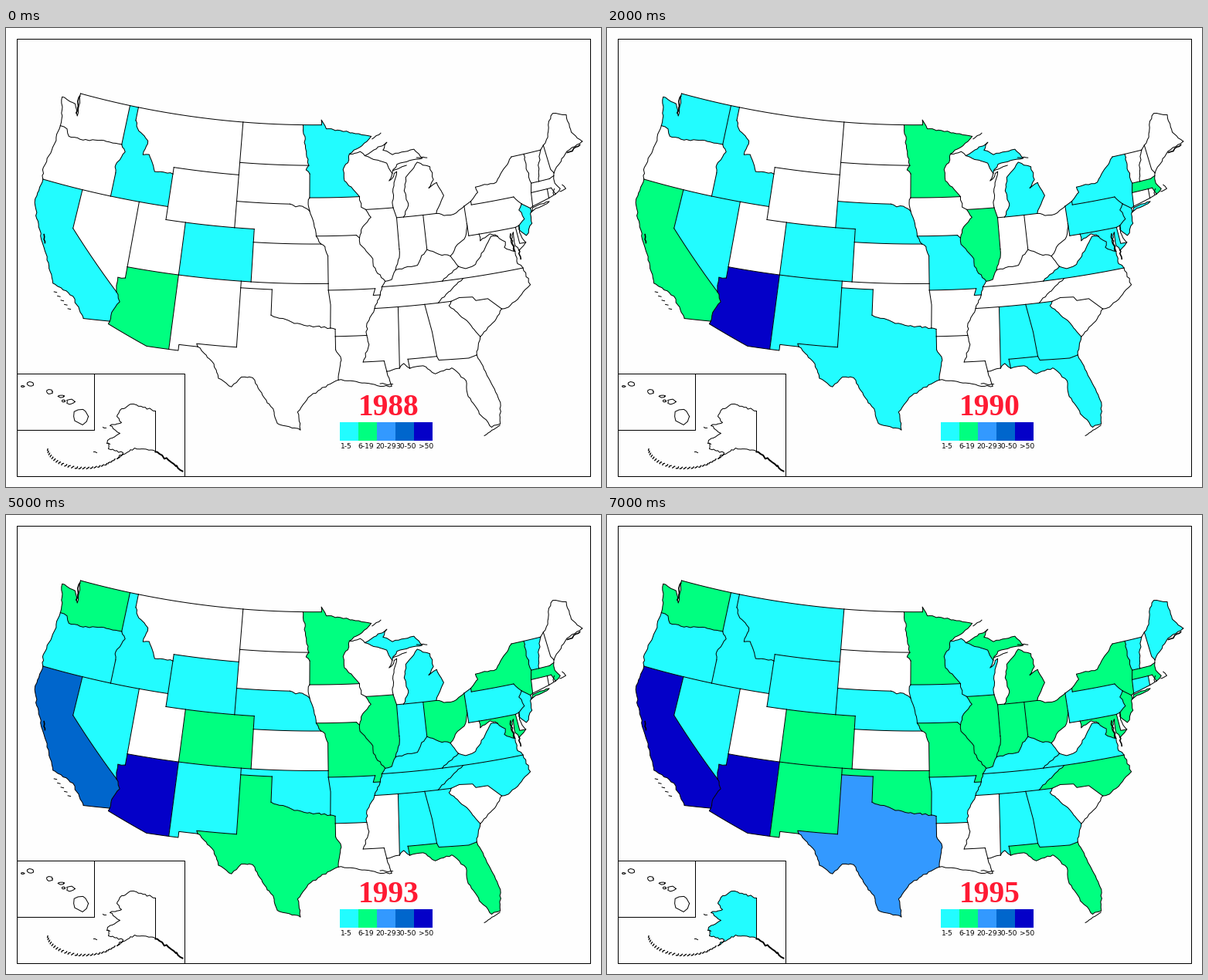
Recreate the animation shown at these times as a matplotlib script. Size 770 by 595 pixels, loop 8000 ms.

```python
import math
import random

import matplotlib.pyplot as plt
from matplotlib.animation import FuncAnimation
from matplotlib.patches import Polygon, Rectangle

W, H, DPI = 770, 595, 100
PX = 72 / DPI
rng = random.Random(5)
COLORS = ["white", "#22fcff", "#00ff80", "#3399ff", "#0066cc", "#0400c8"]
LABELS = ["1-5", "6-19", "20-29", "30-50", ">50"]

fig = plt.figure(figsize=(W / DPI, H / DPI), dpi=DPI, facecolor="#fefefe")
ax = fig.add_axes([0, 0, 1, 1])
ax.set_xlim(-0.5, W - 0.5)
ax.set_ylim(H - 0.5, -0.5)
ax.axis("off")

borders = []


def project(west, north):
    """Conic projection centred on 96 degrees west."""
    angle = (96 - west) * 0.01
    radius = 1346 + 17.15 * (37 - north)
    return 398 + radius * math.sin(angle), radius * math.cos(angle) - 1015


def pairs(values):
    return list(zip(values[::2], values[1::2]))


def subdivide(pts, step, shake=0):
    """Break a polyline into short pieces and shake the inner points."""
    out = [pts[0]]
    for (x0, y0), (x1, y1) in zip(pts, pts[1:]):
        n = max(1, round(math.hypot(x1 - x0, y1 - y0) / step))
        for i in range(1, n):
            t = i / n
            out.append((x0 + (x1 - x0) * t + rng.uniform(-shake, shake),
                        y0 + (y1 - y0) * t + rng.uniform(-shake, shake)))
        out.append((x1, y1))
    return out


def stroke(pts, width=1):
    xs, ys = zip(*pts)
    ax.plot(xs, ys, color="black", lw=width * PX, snap=False, zorder=3)


def border(states, pts):
    borders.append((states.split(), pts))
    stroke(pts)


def line(states, *degrees):
    border(states, [project(*p) for p in subdivide(pairs(degrees), 1)])


def river(states, *degrees):
    border(states, subdivide([project(*p) for p in pairs(degrees)], 4, 1))


def parallel(north, west, *steps):
    """Run east along a latitude: the states that meet, then where they stop."""
    for states, stop in pairs(steps):
        line(states, west, north, stop, north)
        west = stop


def meridian(west, north, *steps):
    """Run south along a longitude in the same way."""
    for states, stop in pairs(steps):
        line(states, west, north, west, stop)
        north = stop


def blot(*degrees, width=1.6, shake=1.5):
    """Dark tangle of small islands and inlets."""
    stroke(subdivide([project(*p) for p in pairs(degrees)], 3, shake), width)


def ring(state):
    """Join the borders of a state end to end."""
    parts = [p for names, p in borders if state in names]
    path = list(parts.pop(0))
    while parts:
        _, i, k = min((math.dist(path[-1], p[-k]), i, k)
                      for i, p in enumerate(parts) for k in (0, 1))
        part = parts.pop(i)
        path += part[::-1] if k else part
    return path


# Surveyed borders
parallel(49, 122.8, "WA", 117.03, "ID", 116.05, "MT", 104.05, "ND", 97.23, "MN", 95.15)
parallel(45.94, 104.05, "ND SD", 96.56)
parallel(45, 111.05, "MT WY", 104.05)
parallel(45, 74.7, "NY", 73.35, "VT", 71.5)
parallel(43.5, 96.45, "MN IA", 91.22)
parallel(43, 104.05, "SD NE", 98.5)
parallel(42.73, 73.27, "VT MA", 72.46, "NH MA", 71.3)
parallel(42.5, 90.64, "IL WI", 87.8)
parallel(42.03, 73.5, "CT MA", 71.8, "RI MA", 71.38)
parallel(42, 124.2, "OR CA", 120, "OR NV", 117.03, "ID NV", 114.04, "ID UT", 111.05)
parallel(42, 79.76, "NY PA", 75.35)
parallel(41.73, 87.53, "IN", 86.82, "MI IN", 84.81, "MI OH", 83.45)
parallel(41, 111.05, "UT WY", 109.05, "WY CO", 104.05, "NE CO", 102.05)
parallel(40.6, 95.77, "IA MO", 91.72)
parallel(40, 102.05, "NE KS", 95.3)
parallel(39.72, 80.52, "PA WV", 79.48, "PA MD", 75.79)
parallel(37, 114.04, "AZ UT", 109.05, "NM CO", 103, "CO OK", 102.05, "KS OK", 94.62)
parallel(36.6, 89.5, "KY TN", 83.68, "VA TN", 81.68, "VA NC", 75.87)
parallel(36.5, 103, "TX OK", 100)
parallel(36.5, 94.62, "MO AR", 90.15)
parallel(35, 90.3, "MS TN", 88.1, "AL TN", 85.6, "GA TN", 84.32, "GA NC", 83.1)
parallel(33, 94.04, "AR LA", 91.17)
parallel(31, 91.6, "LA MS", 89.73)
parallel(31, 87.6, "AL FL", 85)
meridian(120, 42, "CA NV", 39)
meridian(117.03, 49, "WA ID", 46)
meridian(117.03, 43.8, "OR ID", 42)
meridian(116.05, 49, "ID MT", 48)
meridian(114.04, 42, "NV UT", 37, "NV AZ", 36.15)
meridian(111.05, 45, "MT WY", 44.5, "ID WY", 42, "UT WY", 41)
meridian(109.05, 41, "UT CO", 37, "AZ NM", 31.33)
meridian(104.05, 49, "MT ND", 45.94, "MT SD", 45, "WY SD", 43, "WY NE", 41)
meridian(103, 37, "NM OK", 36.5, "NM TX", 32)
meridian(102.05, 41, "NE CO", 40, "CO KS", 37)
meridian(100, 36.5, "TX OK", 34.56)
meridian(96.45, 45.3, "SD MN", 43.5)
meridian(94.62, 39.1, "KS MO", 37, "MO OK", 36.5)
meridian(94.04, 33.55, "AR TX", 33, "TX LA", 32)
meridian(87.53, 41.73, "IL IN", 39.35)
meridian(84.81, 41.73, "IN OH", 39.1)
meridian(80.52, 41.98, "OH PA", 40.64, "PA WV", 39.72)
meridian(79.76, 42.27, "NY PA", 42)

# Slanted borders
line("CA NV", 120, 39, 114.63, 35)
line("CA", 117.12, 32.53, 114.72, 32.72)
line("AZ", 114.72, 32.72, 114.81, 32.5, 111.07, 31.33, 109.05, 31.33)
line("NM", 109.05, 31.33, 108.2, 31.33, 108.2, 31.78, 106.5, 31.78)
line("NM TX", 103, 32, 106.62, 32, 106.5, 31.78)
line("AR OK", 94.62, 36.5, 94.43, 35.4, 94.48, 33.64)
line("MO AR", 90.15, 36.5, 90.37, 36, 89.7, 36)
line("IA MO", 91.72, 40.6, 91.42, 40.38)
line("IL", 87.8, 42.5, 87.53, 41.73)
line("MS AL", 88.1, 35, 88.4, 30.37)
line("LA MS", 89.73, 31, 89.55, 30.2)
line("AL GA", 85.6, 35, 85.18, 32.87, 85, 31)
line("AL FL", 87.6, 31, 87.5, 30.3)
line("GA FL", 85, 31, 84.86, 30.7, 82.2, 30.57, 81.45, 30.72)
line("SC NC", 83.1, 35, 82.3, 35.2, 81.05, 35.1, 80.8, 34.8, 79.67, 34.8, 78.55, 33.86)
line("MD DE", 75.79, 39.72, 75.7, 38.46, 75.1, 38.45)
line("PA DE", 75.79, 39.72, 75.42, 39.8)
line("PA", 80.52, 41.98, 79.76, 42.27)
line("NY NJ", 74.7, 41.36, 73.92, 40.9)
line("NY", 73.65, 41, 73.92, 40.9)
line("NY CT", 73.5, 42.03, 73.65, 41)
line("NY MA", 73.27, 42.74, 73.5, 42.03)
line("CT", 73.65, 41, 71.86, 41.32)
line("CT RI", 71.8, 42.03, 71.86, 41.32)
line("RI", 71.86, 41.32, 71.1, 41.5)
line("RI MA", 71.38, 42.03, 71.1, 41.5)
line("NH", 71.5, 45, 71.08, 45.3)
line("NH ME", 71.08, 45.3, 70.97, 43.4, 70.72, 43.08)
line("NH", 70.72, 43.08, 70.82, 42.87)

# Rivers and ridges
river("WA OR", 124, 46.25, 123.2, 46.15, 122.8, 45.65, 121.2, 45.65, 119, 46, 117.03, 46)
river("OR ID", 117.03, 46, 116.5, 45.5, 117.2, 44.4, 117.03, 43.8)
river("ID MT", 116.05, 48, 115.7, 47.45, 114.3, 46.65, 114.55, 45.55, 113.9, 45.65,
      113, 44.45, 111.05, 44.5)
river("NV AZ", 114.04, 36.15, 114.75, 36.1, 114.63, 35)
river("CA AZ", 114.63, 35, 114.15, 34.3, 114.7, 33.4, 114.72, 32.72)
river("TX OK", 100, 34.56, 98.1, 34.1, 96.9, 33.85, 94.48, 33.64)
river("AR TX", 94.48, 33.64, 94.04, 33.55)
river("TX LA", 94.04, 32, 93.55, 31.2, 93.85, 29.7)
river("ND MN", 97.23, 49, 96.83, 46.8, 96.56, 45.94)
river("SD MN", 96.56, 45.94, 96.85, 45.6, 96.45, 45.3)
river("SD IA", 96.45, 43.5, 96.6, 43.1, 96.45, 42.5)
river("SD NE", 98.5, 43, 97.9, 42.8, 97.2, 42.85, 96.45, 42.5)
river("NE IA", 96.45, 42.5, 95.85, 41.1, 95.77, 40.6)
river("NE MO", 95.77, 40.6, 95.3, 40)
river("KS MO", 95.3, 40, 94.9, 39.8, 94.62, 39.1)
river("MN WI", 92.1, 46.75, 92.3, 46.1, 92.85, 45.6, 92.75, 44.75, 91.22, 43.5)
river("IA WI", 91.22, 43.5, 91.1, 42.7, 90.64, 42.5)
river("IA IL", 90.64, 42.5, 90.15, 41.9, 91.05, 41.2, 91.42, 40.38)
river("IL MO", 91.42, 40.38, 91.4, 39.9, 90.2, 38.75, 90.2, 38.2, 89.5, 37.3, 89.15, 37)
river("IL IN", 87.53, 39.35, 87.6, 38.7, 88.05, 37.8)
river("IL KY", 88.05, 37.8, 88.5, 37.1, 89.15, 37)
river("IN KY", 84.81, 39.1, 85.4, 38.7, 85.9, 38, 88.05, 37.8)
river("OH WV", 80.52, 40.64, 80.85, 39.7, 81.75, 39.2, 82.6, 38.4)
river("OH KY", 82.6, 38.4, 83.7, 38.65, 84.81, 39.1)
river("KY MO", 89.15, 37, 89.5, 36.6)
river("MO TN", 89.5, 36.6, 89.7, 36)
river("AR TN", 89.7, 36, 90.3, 35)
river("AR MS", 90.3, 35, 91.1, 33.9, 91.17, 33)
river("LA MS", 91.17, 33, 91, 32.3, 91.6, 31)
river("GA SC", 83.1, 35, 83.35, 34.7, 81.9, 33.4, 80.9, 32.05)
river("TN NC", 81.68, 36.6, 83.5, 35.57, 84.32, 35)
river("KY WV", 82.6, 38.4, 81.97, 37.54)
river("KY VA", 81.97, 37.54, 83.68, 36.6)
river("WV VA", 81.97, 37.54, 81.3, 37.3, 80.3, 37.5, 79.3, 38.4, 78.35, 39.4, 77.72, 39.32)
river("WV MD", 79.48, 39.72, 79.48, 39.2, 78.4, 39.6, 77.72, 39.32)
river("VA MD", 77.72, 39.32, 77.05, 38.8, 77.25, 38.4, 76.3, 37.95)
river("PA NJ", 74.7, 41.36, 75.1, 40.95, 74.75, 40.2, 75.42, 39.8)
river("NY PA", 75.35, 42, 74.7, 41.36)
river("NY VT", 73.35, 45, 73.4, 43.7, 73.27, 42.74)
river("VT NH", 71.5, 45, 72, 44.1, 72.46, 42.73)
river("NH MA", 71.3, 42.73, 70.82, 42.87)

# Shores
river("WA", 124, 46.25, 124.1, 47, 124.7, 48.38, 123.1, 48.15, 122.5, 47.3, 122.8, 49)
river("OR", 124, 46.25, 124.07, 44.8, 124.5, 42.85, 124.2, 42)
river("CA", 124.2, 42, 124.4, 40.4, 123.7, 39, 122.4, 37.2, 121.9, 36.6, 120.6, 34.6,
      118.5, 34, 117.12, 32.53)
river("TX", 106.5, 31.78, 104.9, 30.6, 104.4, 29.55, 103.2, 28.98, 102.4, 29.77,
      101.4, 29.77, 100.3, 28.3, 99.5, 27.5, 99.1, 26.4, 97.15, 25.95)
river("TX", 97.15, 25.95, 97.4, 27.3, 96.5, 28.4, 94.8, 29.35, 93.85, 29.7)
river("LA", 93.85, 29.7, 92.3, 29.55, 90.2, 29.1, 89.2, 29.05, 89.5, 29.9, 89.55, 30.2)
river("MS", 89.55, 30.2, 88.4, 30.37)
river("AL", 88.4, 30.37, 88, 30.7, 87.5, 30.3)
river("FL", 81.45, 30.72, 80.55, 28.4, 80.05, 26.9, 80.35, 25.3, 81.1, 25.15, 81.8, 26.1,
      82.7, 27.7, 82.7, 28.9, 83.8, 30, 85.3, 29.7, 86.3, 30.4, 87.5, 30.3)
river("GA", 80.9, 32.05, 81.45, 30.72)
river("SC", 78.55, 33.86, 79.2, 33.2, 80.9, 32.05)
river("NC", 75.87, 36.6, 75.5, 35.25, 76.5, 34.65, 77.9, 33.9, 78.55, 33.86)
river("VA", 76.3, 37.95, 76.3, 37, 75.87, 36.6)
river("MD", 76.3, 37.95, 76.5, 38.8, 76.1, 39.4, 76.2, 38.6, 75.9, 37.95, 75.1, 38.45)
river("DE", 75.42, 39.8, 75.5, 39.3, 75.1, 38.45)
river("NJ", 75.42, 39.8, 75.5, 39.5, 74.9, 38.95, 74.1, 39.75, 73.92, 40.9)
river("LI", 73.95, 40.6, 73.7, 40.9, 71.9, 41.07, 73.95, 40.6)
river("MA", 70.82, 42.87, 70.9, 42.3, 70.5, 41.8, 71.1, 41.5)
river("ME", 71.08, 45.3, 70.4, 45.8, 70, 46.7, 69.2, 47.45, 67.8, 47.07, 67.8, 45.7, 66.95, 44.8)
river("ME", 66.95, 44.8, 68.8, 44.4, 70.72, 43.08)
river("NY", 79.76, 42.27, 78.9, 42.85, 79.05, 43.27, 76.8, 43.35, 76.2, 43.9, 74.7, 45)
river("OH", 83.45, 41.73, 82.7, 41.5, 81.7, 41.5, 80.52, 41.98)
river("MI", 86.82, 41.73, 86.2, 42.6, 86.5, 43.7, 86.2, 44.7, 84.8, 45.75, 83.5, 45.3,
      83.3, 44.3, 83.9, 43.7, 83, 44.05, 82.45, 43, 83.45, 41.73)
river("UP", 90.42, 46.57, 87.9, 47.47, 88.4, 46.9, 87.4, 46.5, 85, 46.75, 84.2, 46,
      87, 45.75, 87.6, 45.1)
river("WI UP", 90.42, 46.57, 88.1, 45.9, 87.6, 45.1)
river("WI", 92.1, 46.75, 90.9, 46.9, 90.42, 46.57)
river("WI", 87.6, 45.1, 88, 44.55, 87.1, 45.2, 87.7, 43.7, 87.8, 42.5)
river("MN", 95.15, 49, 95.15, 49.38, 94.6, 48.7, 93, 48.55, 89.6, 48)
river("MN", 89.6, 48, 91, 47.2, 92.1, 46.75)

# Inlets and islands
blot(122.8, 48.8, 122.7, 47.5)
blot(122.6, 38, 122.3, 37.4)
blot(76.4, 39.3, 76.4, 38)
blot(75.9, 38, 75.9, 37.3)
blot(68.8, 44.3, 67.3, 44.6)
blot(71.3, 41.5, 71.1, 41.9, width=1)
blot(70.6, 41.6, 69.95, 41.7, 70.2, 42.05, width=1, shake=0.7)
blot(89.5, 47.8, 88.5, 48.2, width=1, shake=0.7)
blot(87.5, 45.3, 86, 45.6, width=1)
blot(84.8, 46.1, 83.7, 46, width=1)
blot(90.2, 29.3, 89.1, 29.2, width=1)
blot(81.8, 24.6, 80.4, 25.2, width=1, shake=0.5)
for i in range(5):
    west, north = 120.3 - 0.4 * i, 34 - 0.25 * i
    blot(west, north, west - 0.25, north, width=1, shake=0.8)

# Alaska
border("AK", [(193, 548), (193, 496)])
coast = pairs([193, 496, 162, 487, 147, 495, 143, 503, 149, 511, 134, 515, 147, 525,
               131, 534, 132, 545, 151, 550, 143, 558, 166, 544, 193, 548])
border("AK", subdivide(coast, 3, 1.2))
stroke(subdivide([(193, 549), (228, 574)], 3, 2), 2)
for i in range(24):
    a = math.radians(38 + 5.8 * i)
    x, y = 102 + 49 * math.cos(a), 541 + 28 * math.sin(a)
    stroke(subdivide([(x, y), (x - 3 * math.sin(a), y + 2)], 2, 0.8), 1.3)
for x, y in ((125, 517), (113, 549), (130, 538)):
    stroke(subdivide([(x, y), (x + 4, y + 1)], 2, 1))

# Hawaii: islands as (x, y, half width, half height)
for x, y, rx, ry in ((21, 464, 2, 1), (31, 461, 4, 3), (56, 471, 4, 3), (71, 477, 4, 1.5),
                     (83, 484, 5, 3), (74, 483, 2, 1.5), (96, 503, 9, 10)):
    turns = [math.tau * i / 10 for i in range(10)]
    blob = [(x + rx * rng.uniform(0.8, 1.2) * math.cos(a),
             y + ry * rng.uniform(0.8, 1.2) * math.sin(a)) for a in turns]
    stroke(blob + blob[:1])

# Frame and inset boxes
stroke([(14, 14), (756, 14), (756, 581), (14, 581), (14, 14)])
stroke([(14, 448), (231, 448), (231, 581)])
stroke([(114, 448), (114, 521), (14, 521)])

# Legend
for i, label in enumerate(LABELS):
    ax.add_patch(Rectangle((431.5 + 24 * i, 510.5), 24, 24, lw=0, fc=COLORS[i + 1]))
    ax.text(439.5 + 26 * i, 544.5, label, ha="center", va="baseline",
            family="DejaVu Sans", size=9.2 * PX)
year_text = ax.text(495, 502, "", ha="center", va="baseline", color="#ff1a33",
                    family="Liberation Serif", weight="bold", size=39.5 * PX)

# New level of each state that changes in a year
CHANGES = {
    1988: {1: "CA ID CO MN NJ", 2: "AZ"},
    1989: {4: "AZ"},
    1990: {1: "WA NV NM NE TX MO MI UP NY LI PA MD VA AL GA FL", 2: "CA MN IL MA", 5: "AZ"},
    1991: {1: "WY IN OH KY", 2: "MO TX"},
    1992: {1: "OR NC AR", 2: "WA FL", 3: "CA"},
    1993: {1: "VT OK TN", 2: "CO OH NY LI MD", 4: "CA"},
    1994: {1: "MT WI IA CT AK", 2: "NM MI UP NJ"},
    1995: {1: "ME", 2: "OK IN NC", 3: "TX", 5: "CA"},
}

shapes = {}
for state in sorted({s for names, _ in borders for s in names}):
    shapes[state] = ax.add_patch(Polygon(ring(state), lw=0, fc="white", zorder=2))


def draw(i):
    year = 1988 + i
    level = dict.fromkeys(shapes, 0)
    for y in range(1988, year + 1):
        for value, states in CHANGES[y].items():
            level.update(dict.fromkeys(states.split(), value))
    for state, shape in shapes.items():
        shape.set_facecolor(COLORS[level[state]])
    year_text.set_text(str(year))
    return [*shapes.values(), year_text]


anim = FuncAnimation(fig, draw, frames=len(CHANGES), interval=1000, repeat=True,
                     repeat_delay=0, blit=False)
plt.show()
```
